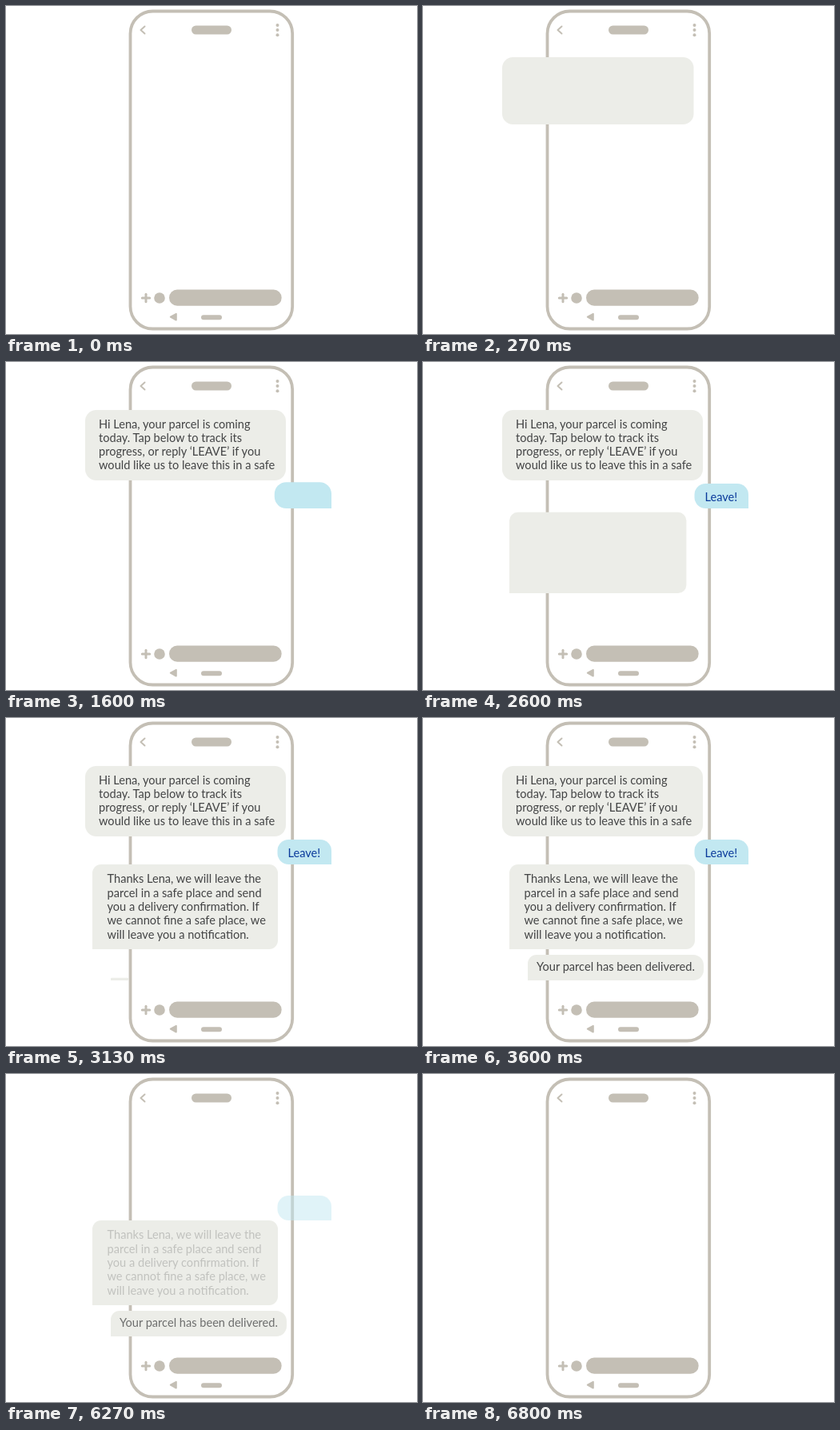
These frames come from a looping animation (514x410 px, 6990 ms). An HTML page with a canvas:

```html
<!DOCTYPE html>
<html lang="en">
<head>
<meta charset="utf-8">
<title>Parcel chat</title>
<style>
  html, body { margin: 0; width: 100%; height: 100%; overflow: hidden; background: #fff; }
  canvas, svg { position: absolute; left: 0; top: 0; width: 514px; height: 410px; }
  text { font: 14.6px Lato, sans-serif; white-space: pre; }
</style>
</head>
<body>
<canvas id="stage"></canvas>
<svg id="words" viewBox="0 0 514 410"></svg>
<script>
const LOOP = 6990, FPS = 15;
const TAUPE = '#c4bfb5', GREY = '#ecede8', BLUE = '#c2e8f1';
const INK = '#434445', NAVY = '#0a3a9b';
const LINE = 17.3, FADE = 4, PEAK = 1.055;

// box: x, y, w, h; radii: tl, tr, br, bl; origin: fixed corner while popping.
// Times are counted in ticks of 1/15 s.
const bubbles = [
  { box: [99, 60, 251, 88], radii: [14, 14, 14, 14], origin: [99, 148], fill: GREY,
    pop: 0, gone: 89, ink: INK, at: [116, 82.5], textIn: 4, textOut: 86,
    lines: ['Hi Lena, your parcel is coming', 'today. Tap below to track its',
            'progress, or reply ‘LEAVE’ if you', 'would like us to leave this in a safe'] },
  { box: [339.5, 152, 67.5, 31], radii: [14, 14, 0, 14], origin: [407, 183], fill: BLUE,
    pop: 19, gone: 92, ink: NAVY, at: [352.5, 173.5], textIn: 27, textOut: 88,
    lines: ['Leave!'] },
  { box: [108, 183, 232, 106], radii: [11, 11, 11, 0], origin: [108, 289], fill: GREY,
    pop: 35, gone: 95, ink: INK, at: [126.5, 206.3], textIn: 39, textOut: 91,
    lines: ['Thanks Lena, we will leave the', 'parcel in a safe place and send',
            'you a delivery confirmation. If', 'we cannot fine a safe place, we',
            'will leave you a notification.'] },
  { box: [131, 296, 220, 32], radii: [11, 13, 13, 0], origin: [131, 328], fill: GREY,
    pop: 46, gone: 98, ink: INK, at: [142, 316.2], textIn: 50, textOut: 93,
    lines: ['Your parcel has been delivered.'] }
];

const canvas = document.getElementById('stage');
const g = canvas.getContext('2d');
const dpr = window.devicePixelRatio || 1;
canvas.width = 514 * dpr;
canvas.height = 410 * dpr;

function svg(tag, attrs, parent) {
  const el = document.createElementNS('http://www.w3.org/2000/svg', tag);
  for (const k in attrs) el.setAttribute(k, attrs[k]);
  parent.appendChild(el);
  return el;
}

for (const b of bubbles) {
  b.text = svg('text', { fill: b.ink }, document.getElementById('words'));
  b.lines.forEach((line, i) => {
    svg('tspan', { x: b.at[0], y: b.at[1] + i * LINE }, b.text).textContent = line;
  });
}

const clamp = v => Math.max(0, Math.min(1, v));
const ease = p => (1 - Math.cos(Math.PI * clamp(p))) / 2;
const ramp = (n, start) => clamp((n - start) / FADE);

// Grow past full size in five ticks, then settle in two.
function popScale(k) {
  return k <= 5 ? PEAK * ease(k / 5) : PEAK + (1 - PEAK) * ease((k - 5) / 2);
}

function pill(x, y, w, h) {
  g.beginPath();
  g.roundRect(x, y, w, h, h / 2);
  g.fill();
}

function dot(x, y, r) {
  g.beginPath();
  g.arc(x, y, r, 0, 2 * Math.PI);
  g.fill();
}

function stroke(width, ...points) {
  g.lineWidth = width;
  g.beginPath();
  points.forEach(([x, y]) => g.lineTo(x, y));
  g.stroke();
}

function drawPhone() {
  g.fillStyle = g.strokeStyle = TAUPE;
  g.lineCap = g.lineJoin = 'round';
  g.lineWidth = 3.8;
  g.beginPath();
  g.roundRect(155.5, 6.5, 202.7, 397, 28);
  g.stroke();

  pill(232, 24.5, 50, 11);
  stroke(2, [173.5, 25.5], [168.5, 30], [173.5, 34.5]);
  for (const y of [24, 30, 36.3]) dot(339.5, y, 2);

  stroke(3, [170.3, 365], [179.7, 365]);
  stroke(3, [175, 360.3], [175, 369.7]);
  dot(192, 365, 6.8);
  pill(204, 354.5, 140.7, 20.3);

  g.lineWidth = 2;
  g.beginPath();
  g.moveTo(205.8, 388.7);
  g.lineTo(212.8, 384.8);
  g.lineTo(212.8, 392.6);
  g.closePath();
  g.fill();
  g.stroke();
  pill(244, 386.2, 26, 6);
}

function drawBubble(b, n) {
  b.text.style.opacity = ramp(n, b.textIn) * (1 - ramp(n, b.textOut));
  const s = popScale(Math.max(0, n - b.pop));
  const alpha = 1 - ramp(n, b.gone);
  if (!s || !alpha) return;
  const [ox, oy] = b.origin;
  g.save();
  g.globalAlpha = alpha;
  g.translate(ox, oy);
  g.scale(s, s);
  g.translate(-ox, -oy);
  g.fillStyle = b.fill;
  g.beginPath();
  g.roundRect(...b.box, b.radii);
  g.fill();
  g.restore();
}

function render(t) {
  const n = Math.floor(t * FPS / 1000 + 0.06);
  g.setTransform(dpr, 0, 0, dpr, 0, 0);
  g.fillStyle = '#fff';
  g.fillRect(0, 0, 514, 410);
  drawPhone();
  for (const b of bubbles) drawBubble(b, n);
}

const start = performance.now();
function tick() {
  render((performance.now() - start) % LOOP);
  requestAnimationFrame(tick);
}
tick();
</script>
</body>
</html>
```
